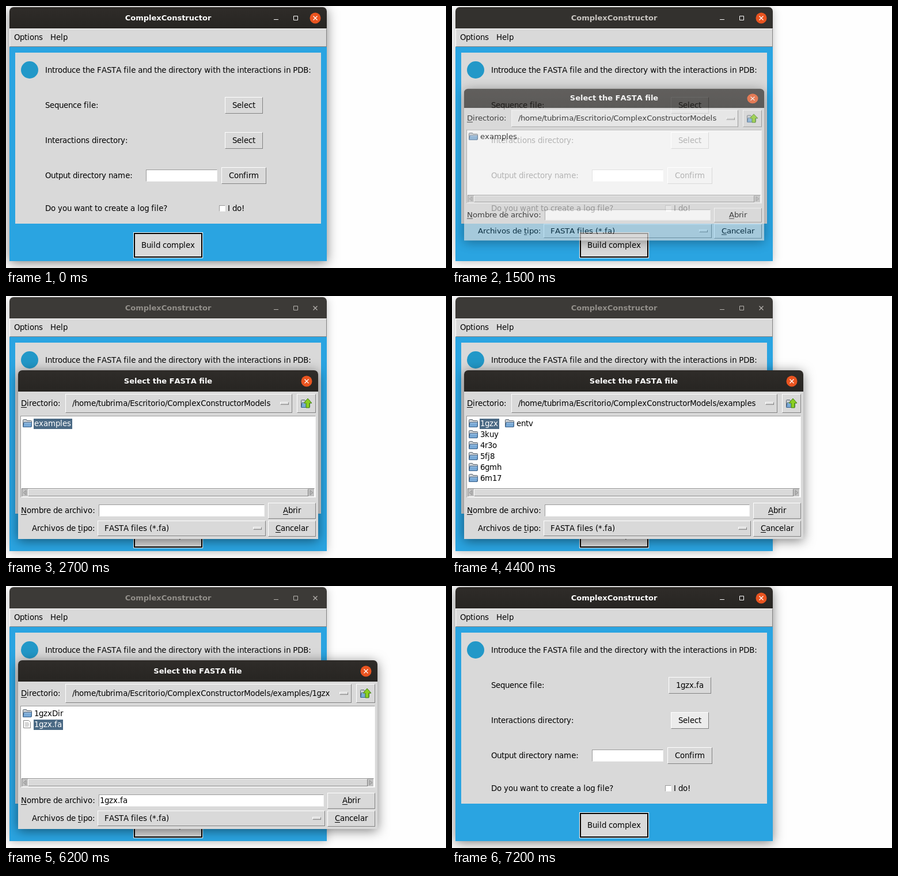
An HTML page for the animation above (8 s loop, 764 by 455 pixels).

```html
<!DOCTYPE html>
<html lang="en">
<head>
<meta charset="utf-8">
<title>ComplexConstructor</title>
<style>
html, body { margin: 0; width: 100%; height: 100%; overflow: hidden; background: #fefefe; }
#stage { position: relative; width: 764px; height: 455px; overflow: hidden;
  font: 13.333px/21px "DejaVu Sans", sans-serif; font-kerning: none; color: #000; }
#stage div { position: absolute; box-sizing: border-box; white-space: pre; }
#stage svg { position: absolute; overflow: visible; }
u { text-decoration-thickness: 1px; text-underline-offset: 2px; }

.window { border-radius: 7px 7px 0 0; box-shadow: 0 3px 20px rgba(0,0,0,.5); }
.window.light { box-shadow: 0 2px 16px rgba(0,0,0,.25); }
.bar { border-radius: 7px 7px 0 0; background: linear-gradient(#2f2c29, #272522);
  color: #fff; font-size: 13px; font-weight: bold; text-align: center; }
.fading .bar { background: #33312e; color: #c8c5c1; }
.dim .bar { background: #3c3a37; color: #928f8a; }
.dim .bar circle { opacity: 0; }
.dim .bar path { stroke: #b5b2ae; }
.bar path { fill: none; stroke: #fff; }

.raised { background: #d9d9d9; border: 1px solid; border-color: #fff #828282 #828282 #fff; }
.sunken { background: #fff; border: 1px solid; border-color: #9a9a9a #f4f4f4 #f4f4f4 #9a9a9a; }
.button { text-align: center; }
.hover { background: #ececec; }
.pressed { border-color: #828282 #fff #fff #828282; }
.menu { padding-left: 11px; }
.blue { background: #2aa4e1; }
.grey { background: #d9d9d9; }
.logo { background: #2298c8; border-radius: 50%; }
.default { border: 2px solid #000; outline: 1px solid #fff; background: #d9d9d9; text-align: center; }
.entry { padding-left: 1px; }
.caret { background: #000; }
.trough { background: #c3c3c3; border: 1px solid; border-color: #828282 #fff #fff #828282; }
.item { padding: 0 2px 0 1px; }
.selected { background: #4a6984; color: #fff; }
</style>
</head>
<body>
<div id="stage"></div>
<script>
const stage = document.getElementById('stage');
const LOOP = 8000;

// The toolkit advances every glyph by whole pixels.
const pen = document.createElement('canvas').getContext('2d');
pen.font = '13.333px "DejaVu Sans", sans-serif';
function snap(html) {
  return html.replace(/(<[^>]*>)|./g, (part, tag) => {
    if (tag) return tag;
    const { width } = pen.measureText(part);
    return `<span style="letter-spacing:${(Math.round(width) - width).toFixed(3)}px">${part}</span>`;
  });
}

// Negative x values count from the parent's right edge.
function add(parent, cls, [x1, y1, x2, y2], html = '') {
  const el = document.createElement('div');
  el.className = cls;
  const s = el.style;
  s.top = y1 + 'px';
  s.height = y2 - y1 + 'px';
  const border = /default/.test(cls) ? 3 : /raised|sunken/.test(cls) ? 2 : 0;
  s.lineHeight = y2 - y1 - border + 'px';
  if (x1 >= 0) s.left = x1 + 'px';
  if (x2 < 0) s.right = -x2 + 'px';
  if (x1 < 0 || x2 >= 0) s.width = x2 - x1 + 'px';
  el.innerHTML = cls === 'bar' ? html : snap(html);
  parent.append(el);
  return el;
}

function label(parent, x, mid, html) {
  const el = add(parent, '', [x, mid - 10, x, mid + 11], html);
  el.style.width = 'auto';
  return el;
}

const svg = (x, y, body) =>
  `<svg width="16" height="16" style="left:${x}px;top:${y}px">${body}</svg>`;

const folderShape =
  '<path d="M.5 13.5V2.5q0-1 1-1h5l1 2h7q1 0 1 1v9z" fill="#c9cdd1" stroke="#59646f"/>' +
  '<path d="M.7 14.5L2 6.5h13.5l-.6 8z" fill="#79a9d6" stroke="#345d88"/>' +
  '<path d="M2.9 7.5h11.5" stroke="#b4d2ec"/>';
const pageShape =
  '<path d="M1.5 1.5h9l3 3v10h-12z" fill="#fafafa" stroke="#858585"/>' +
  '<path d="M4 5.5h6M4 7.5h7M4 9.5h7M4 11.5h6" stroke="#b2b2b2"/>';
const upShape = folderShape +
  '<path d="M12 -1l7 8h-4v8h-6v-8h-4z" fill="#8bcf22" stroke="#3d7d10"/>';

const closeIcon =
  '<svg width="20" height="20" style="right:10px;top:9px">' +
  '<circle cx="10" cy="10" r="9.5" fill="#e95420"/>' +
  '<path d="M6.5 6.5l7 7m0-7l-7 7" stroke-width="1.3"/></svg>';
const sizeIcons =
  '<svg width="50" height="20" style="right:50px;top:9px">' +
  '<path d="M8 12.5h8M42.5 6.5h7v7h-7z"/></svg>';

// Main window
const main = add(stage, 'window', [6, 2, 557, 443]);
add(main, 'bar', [0, 0, 551, 38], 'ComplexConstructor' + sizeIcons + closeIcon);
add(main, 'blue', [0, 69, 551, 441]);
add(main, 'raised', [0, 37, 551, 69]);
label(stage, 14, 54, 'Options');
label(stage, 77, 54, 'Help');
add(stage, 'grey', [16, 81, 547, 378]);
add(stage, 'logo', [26, 96, 56, 126]);
label(stage, 68, 111, 'Introduce the FASTA file and the directory with the interactions in PDB:');
label(stage, 68, 172, 'Sequence file:');
label(stage, 68, 233, 'Interactions directory:');
label(stage, 68, 294, 'Output directory name:');
label(stage, 68, 351, 'Do you want to create a log file?');
label(stage, 385, 351, 'I do!');
const sequence = add(stage, 'raised button', [380, 158, 446, 187], 'Select');
const chosen = add(stage, 'raised button', [376, 158, 450, 187], '1gzx.fa');
const interactions = add(stage, 'raised button', [380, 219, 446, 248], 'Select');
add(stage, 'sunken', [243, 284, 367, 305]);
add(stage, 'raised button', [374, 280, 452, 309], 'Confirm');
add(stage, 'sunken', [370, 346, 381, 357]);
add(stage, 'default', [222, 394, 341, 437], 'Build complex');

// File dialog
const dialog = add(stage, 'window grey', [21, 129, 542, 422]);
add(dialog, 'bar', [0, 0, -0.001, 37], 'Select the FASTA file' + closeIcon);
label(dialog, 5, 57, '<u>D</u>irectorio:');
const folder = add(dialog, 'raised menu', [82, 41, -45, 74]);
add(dialog, 'raised', [-66, 55, -51, 60]);
add(dialog, 'raised', [-37, 41, -4, 74], svg(6, 8, upShape));
add(dialog, 'sunken', [4, 79, -4, 221]);
add(dialog, 'trough', [6, 205, -6, 220]);
add(dialog, 'raised', [17, 206, -17, 219]);
const arrow = d => `<svg width="10" height="13"><path d="${d}" fill="#b8b8b8" stroke="#929292"/></svg>`;
add(dialog, '', [6, 206, 16, 219], arrow('M8 2.5v8l-5-4z'));
add(dialog, '', [-16, 206, -6, 219], arrow('M2 2.5v8l5-4z'));
label(dialog, 5, 243, '<u>N</u>ombre de archivo:');
const entry = add(dialog, 'sunken entry', [140, 233, -93, 254]);
const caret = add(dialog, 'caret', [142, 235, 143, 252]);
add(dialog, 'raised button', [-87, 230, -4, 258], '<u>A</u>brir');
label(dialog, 24, 274, 'Archivos de <u>t</u>ipo:');
add(dialog, 'raised menu', [138, 261, -91, 288], 'FASTA files (*.fa)');
add(dialog, 'raised', [-113, 272, -98, 277]);
add(dialog, 'raised button', [-87, 261, -4, 289], '<u>C</u>ancelar');

const home = '/home/tubrima/Escritorio/ComplexConstructorModels';
const views = [
  { path: home, width: 521, files: ['examples'] },
  { path: home + '/examples', width: 589,
    files: ['1gzx', '3kuy', '4r3o', '5fj8', '6gmh', '6m17', 'entv'] },
  { path: home + '/examples/1gzx', width: 624, files: ['1gzxDir', '1gzx.fa'] }
];
for (const view of views) {
  view.el = add(dialog, '', [0, 0, 0, 0]);
  view.items = view.files.map((name, i) => {
    const x = 8 + 63 * Math.floor(i / 6), y = 84 + 19 * (i % 6);
    view.el.insertAdjacentHTML('beforeend',
      svg(x, y, name.endsWith('.fa') ? pageShape : folderShape));
    const item = add(view.el, 'item', [x + 19, y, x + 19, y + 18], name);
    item.style.width = 'auto';
    return item;
  });
}

// Each step changes part of the state from its time on.
const steps = [
  [0, { focus: '', light: false, button: '', other: '', done: false, shown: 0, grow: 1,
        view: 0, picked: '', file: '', caret: false, menu: false }],
  [700, { button: 'hover' }],
  [1200, { button: 'hover pressed' }],
  [1400, { button: '', light: true }],
  [1500, { focus: 'fading', shown: .7, grow: .9, menu: true }],
  [1600, { focus: 'dim', shown: 1, grow: 1, caret: true }],
  [2100, { menu: false }],
  [2200, { caret: false }],
  [2400, { caret: true }],
  [2700, { caret: false, picked: 'examples' }],
  [3100, { view: 1, picked: '' }],
  [4400, { picked: '1gzx' }],
  [5100, { view: 2, picked: '' }],
  [6200, { picked: '1gzx.fa', file: '1gzx.fa' }],
  [6500, { shown: 0, done: true }],
  [6600, { focus: 'fading' }],
  [6700, { focus: '', light: false }],
  [7200, { other: 'hover' }]
];

const show = (el, on) => { el.style.visibility = on ? '' : 'hidden'; };

function render(time) {
  const s = Object.assign({}, ...steps.filter(([at]) => at <= time).map(step => step[1]));
  main.className = `window ${s.focus} ${s.light ? 'light' : ''}`;
  sequence.className = 'raised button ' + s.button;
  interactions.className = 'raised button ' + s.other;
  show(sequence, !s.done);
  show(chosen, s.done);
  dialog.style.opacity = s.shown;
  dialog.style.transform = s.grow < 1 ? `scaleY(${s.grow})` : 'none';
  dialog.style.width = views[s.view].width + 'px';
  folder.innerHTML = snap(views[s.view].path);
  folder.classList.toggle('hover', s.menu);
  entry.innerHTML = snap(s.file);
  show(caret, s.caret);
  views.forEach((view, i) => {
    view.el.style.display = i === s.view ? '' : 'none';
    view.items.forEach((item, k) =>
      item.classList.toggle('selected', view.files[k] === s.picked));
  });
}

const start = performance.now();
let last = -1;
function tick() {
  const time = (performance.now() - start) % LOOP;
  const now = steps.filter(([at]) => at <= time).length;
  if (now !== last) render(time);
  last = now;
  requestAnimationFrame(tick);
}
tick();
</script>
</body>
</html>
```
